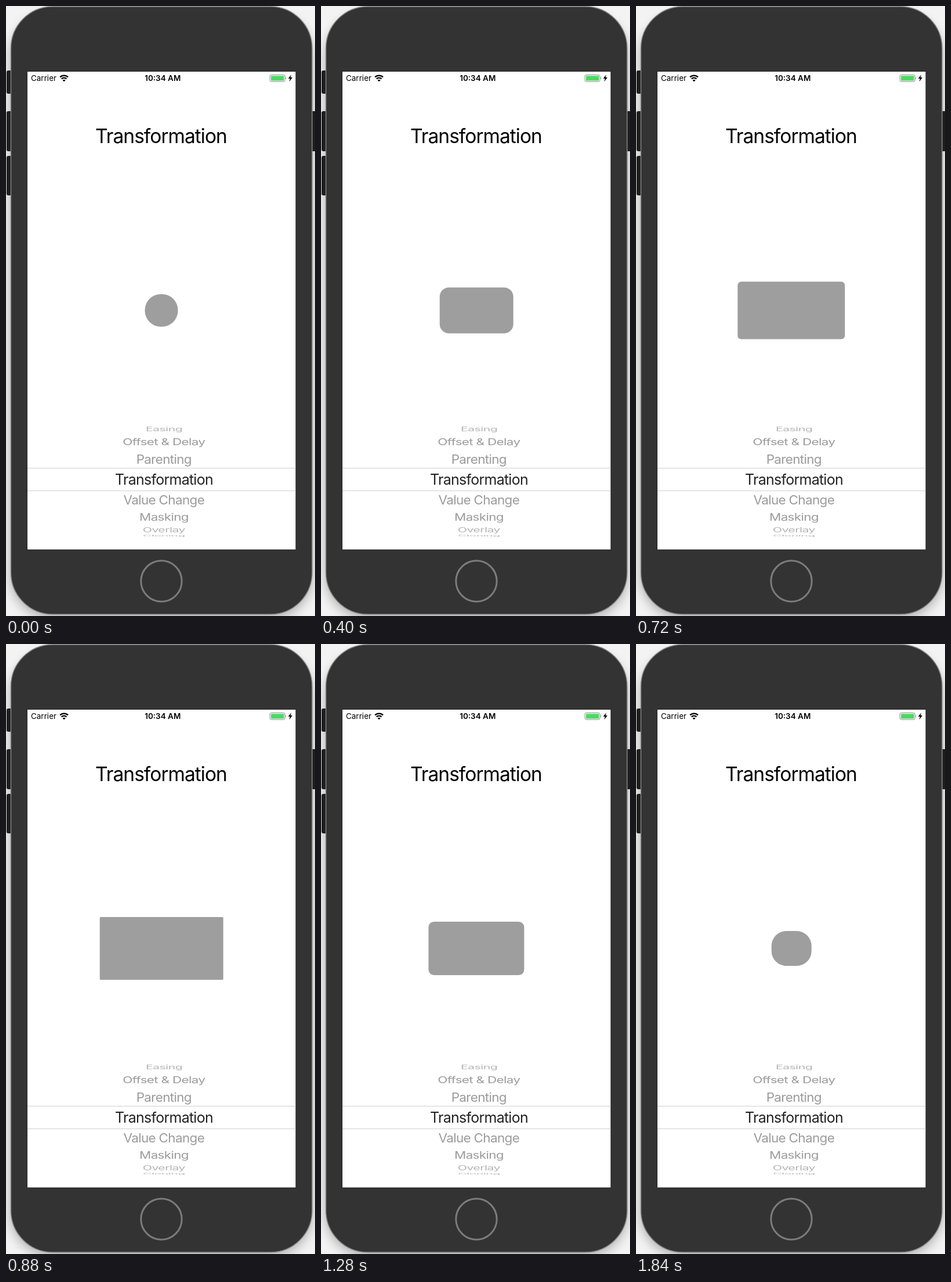
Recreate the animation shown at these times as an HTML page. Size 533 by 1050 pixels, loop 1.92 s.

```html
<!DOCTYPE html>
<html lang="en">
<head>
<meta charset="utf-8">
<title>Transformation</title>
<style>
  @property --grow {
    syntax: "<number>";
    inherits: false;
    initial-value: 0;
  }
  html, body { margin: 0; width: 100%; height: 100%; overflow: hidden; background: #f3f3f3; }
  svg { position: absolute; left: 0; top: 0; display: block; }
  text {
    font-family: Inter, Roboto, sans-serif;
    font-optical-sizing: none;
    text-anchor: middle;
  }
  .status { font-size: 13.5px; }
  .time { font-weight: 600; }
  .title { font-size: 33.6px; letter-spacing: -.03em; }
  .wheel text { font-size: 22.5px; letter-spacing: -.03em; fill: #9b9b9b; }
  .wheel .far { font-size: 21.4px; fill: #b4b4b4; }
  .wheel .chosen { font-size: 25px; fill: #222; }

  /* A circle stretches into a 2:1 rectangle while its corners sharpen. */
  .shape {
    position: absolute;
    left: 268px;
    top: 524px;
    width: calc(55.6px + 166.4px * var(--grow));
    height: calc(55.6px + 55.4px * var(--grow));
    border-radius: calc(27.8px * (1 - var(--grow)));
    transform: translate(-50%, -50%);
    background: #9e9e9e;
    animation: stretch 1920ms infinite;
  }
  /* Every step lasts 80 ms. */
  @keyframes stretch {
    0%      { --grow: .008; animation-timing-function: steps(3); }
    12.5%   { --grow: .243; animation-timing-function: steps(4); }
    29.1667% { --grow: .61; animation-timing-function: steps(2); }
    37.5%   { --grow: .78;  animation-timing-function: steps(2); }
    45.8333% { --grow: .943; animation-timing-function: steps(1); }
    50%     { --grow: .98;  animation-timing-function: steps(2); }
    58.3333% { --grow: .835; animation-timing-function: steps(5); }
    79.1667% { --grow: .393; animation-timing-function: steps(2); }
    87.5%   { --grow: .219; animation-timing-function: steps(2); }
    95.8333% { --grow: .078; animation-timing-function: steps(1); }
    100%    { --grow: .008; }
  }
</style>
</head>
<body>
<svg width="533" height="1050" viewBox="0 0 533 1050">
  <defs>
    <filter id="soft" x="-10%" y="-10%" width="120%" height="120%">
      <feGaussianBlur stdDeviation="10"/>
    </filter>
  </defs>

  <rect x="8" y="14" width="520" height="1040" rx="74" fill="#000" opacity=".3" filter="url(#soft)"/>

  <g fill="#1e1e1e">
    <rect x="1" y="111" width="12" height="40" rx="3"/>
    <rect x="1" y="181" width="12" height="69" rx="3"/>
    <rect x="1" y="258" width="12" height="68" rx="3"/>
    <rect x="522" y="181" width="14" height="69" rx="3"/>
  </g>
  <rect x="8.5" y="1" width="519.5" height="1046" rx="72" fill="#333" stroke="#858585" stroke-width="1.5"/>
  <rect x="36" y="112" width="464.5" height="825" fill="#262626"/>
  <rect x="37" y="113" width="462.5" height="822.5" fill="#fff"/>
  <circle cx="268" cy="990" r="35.2" fill="none" stroke="#7c7c7c" stroke-width="3"/>

  <g class="status">
    <text x="65" y="129">Carrier</text>
    <text class="time" x="270.3" y="129">10:34 AM</text>
    <g fill="none" stroke="#000" stroke-width="2.3">
      <path d="M93.2 122.4a9.8 9.8 0 0 1 13.8 0"/>
      <path d="M95.8 125.4a6.1 6.1 0 0 1 8.6 0"/>
    </g>
    <path d="M97.5 127.6q2.6-1.8 5.2 0l-2.6 2.7z"/>
    <rect x="455.2" y="118.5" width="26" height="11.6" rx="2.5" fill="#fff" stroke="#8c8c8c"/>
    <rect x="457" y="120.2" width="22.5" height="8.2" rx="1" fill="#4cd964"/>
    <path d="M482.3 122.3q2.2 2 0 4z" fill="#8c8c8c"/>
    <path d="M491.8 118.3l-5 6.8h3l-1.2 5.2 5.4-7.2h-3.2z"/>
  </g>

  <text class="title" x="267.5" y="236.3">Transformation</text>

  <g class="wheel">
    <path d="M37 795.5H499.5M37 834.5H499.5" stroke="#d0d0d0"/>
    <text class="far" transform="translate(272.5 732) scale(1 .48)">Easing</text>
    <text transform="translate(272.3 755.5) scale(1 .73)">Offset &amp; Delay</text>
    <text transform="translate(272.3 788) scale(1 .94)">Parenting</text>
    <text class="chosen" x="272.5" y="824">Transformation</text>
    <text transform="translate(272.3 858) scale(1 .94)">Value Change</text>
    <text transform="translate(272.5 886.3) scale(1 .74)">Masking</text>
    <text class="far" transform="translate(272.3 906) scale(1 .53)">Overlay</text>
    <text class="far" transform="translate(272.3 913.3) scale(1 .17)">Cloning</text>
  </g>
</svg>
<div class="shape"></div>
</body>
</html>
```
